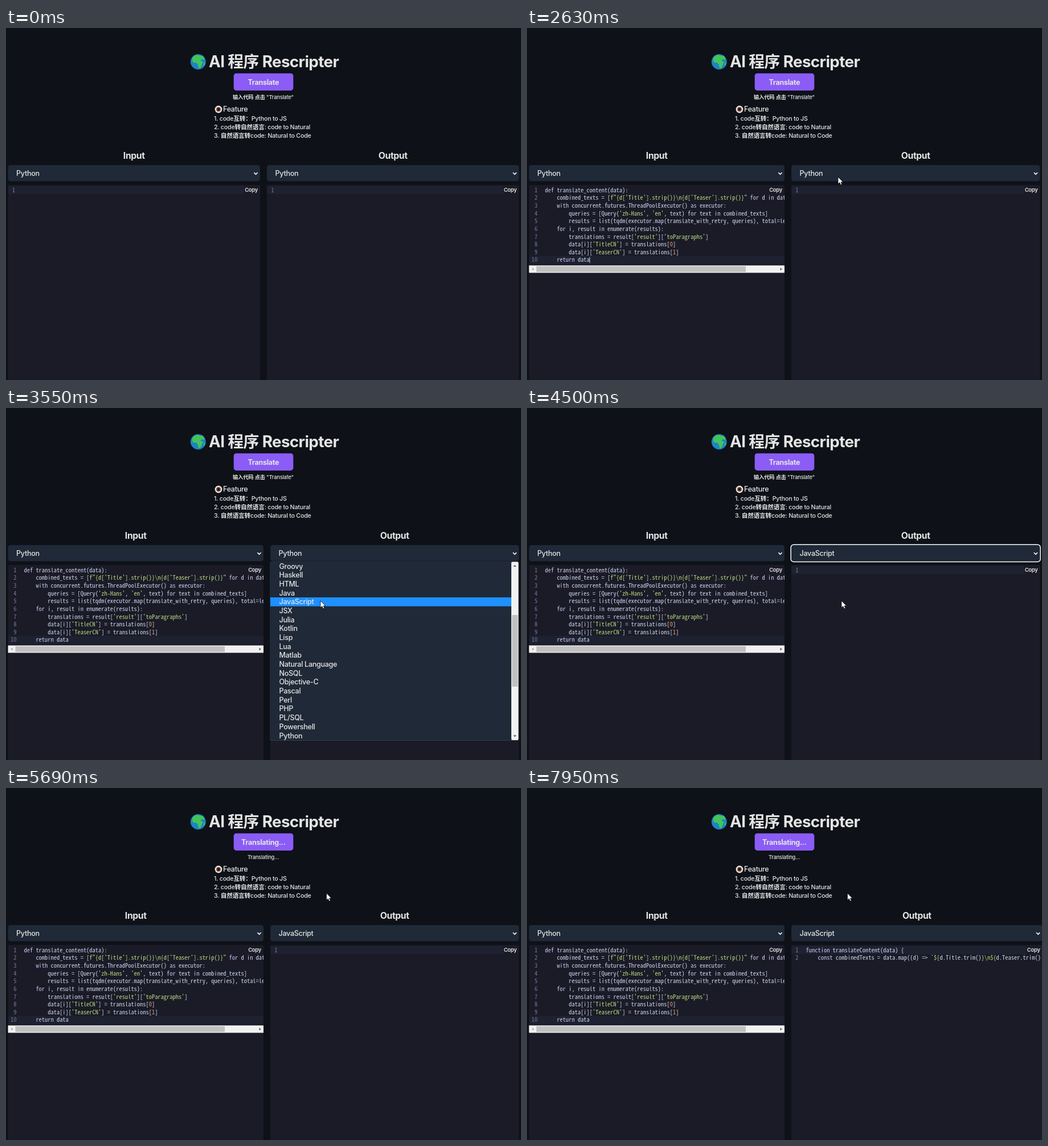
An HTML page that plays this animation: 904 by 619 pixels, repeating every 8000 ms.

```html
<!DOCTYPE html>
<html lang="zh">
<head>
<meta charset="utf-8">
<title>AI 程序 Rescripter</title>
<style>
  html, body { margin: 0; width: 100%; height: 100%; overflow: hidden; background: #0e1117; }
  svg { display: block; }
  text { font-family: Inter, "Noto Sans CJK SC", "Noto Sans CJK", sans-serif; fill: #e5e5e5; letter-spacing: -.022em; white-space: pre; }
  .code { font-family: "Noto Sans Mono CJK SC", "Liberation Mono", monospace; fill: #d0d7f2; letter-spacing: 0; }
  .kw { fill: #cbc6f2; }
  .str { fill: #bfdc86; }
  .num { fill: #ff9e64; }
  .gutter { fill: #787c99; }
</style>
</head>
<body>
<svg id="stage" width="904" height="619" viewBox="0 0 904 619"></svg>
<script>
const LOOP = 8000, ROW = 13.65, PITCH = 5.225, OPTION = 15.68;
const stage = document.getElementById('stage');

// Times of the state changes, in ms.
const PASTE = 2230, OPEN = 2750, PICK = 4500, CLICK = 5300, BUSY = 5430, LEAVE = 5580, WIDEN = 7950;

const pointer = [
  [100, 816, 589], [230, 640, 510], [360, 430, 420], [490, 259, 343],
  [640, 262, 338], [770, 256, 328], [900, 250, 320], [1020, 244, 313],
  [1300, 231, 296], [1430, 219, 281], [1830, 232, 298],
  [2230, 310, 296], [2360, 440, 284], [2480, 530, 270], [2630, 546, 262],
  [3030, 547, 276], [3160, 549, 299], [3290, 550, 317], [3420, 551, 331], [3550, 552, 339],
  [4630, 500, 250], [4750, 434, 150], [4900, 437, 114], [5020, 440, 98],
  [5580, 503, 142], [5690, 562.5, 185]
];

const typed = [
  [6350, 'function'], [6480, ' translateContent('], [6620, 'data) {'],
  [6750, '\n    const'], [6880, ' combinedTexts ='],
  [7020, ' data'], [7150, '.map(('], [7280, 'd) => `'], [7400, '${d.Title'],
  [7670, '.trim()}\\n'], [7820, '${d.Teaser'], [7950, '.trim()']
];

const python = String.raw`def translate_content(data):
    combined_texts = [f"{d['Title'].strip()}\n{d['Teaser'].strip()}" for d in data]
    with concurrent.futures.ThreadPoolExecutor() as executor:
        queries = [Query('zh-Hans', 'en', text) for text in combined_texts]
        results = list(tqdm(executor.map(translate_with_retry, queries), total=len(queries)))
    for i, result in enumerate(results):
        translations = result['result']['toParagraphs']
        data[i]['TitleCN'] = translations[0]
        data[i]['TeaserCN'] = translations[1]
    return data`;

const options = ['Groovy', 'Haskell', 'HTML', 'Java', 'JavaScript', 'JSX', 'Julia', 'Kotlin', 'Lisp', 'Lua',
  'Matlab', 'Natural Language', 'NoSQL', 'Objective-C', 'Pascal', 'Perl', 'PHP', 'PL/SQL', 'Powershell', 'Python'];

// Size the code font so that one column is PITCH wide.
const pen = document.createElement('canvas').getContext('2d');
pen.font = '100px "Noto Sans Mono CJK SC", "Liberation Mono", monospace';
const codeSize = 100 * PITCH / pen.measureText('0').width;

const rect = (x, y, w, h, fill, r = 0) =>
  `<rect x="${x}" y="${y}" width="${w}" height="${h}" rx="${r}" fill="${fill}"/>`;
const path = (d, fill, more = '') => `<path d="${d}" fill="${fill}" ${more}/>`;
const circle = (x, y, r, fill) => `<circle cx="${x}" cy="${y}" r="${r}" fill="${fill}"/>`;
const label = (x, y, size, str, weight = 450, anchor = 'start') =>
  `<text x="${x}" y="${y}" font-size="${size}" font-weight="${weight}" text-anchor="${anchor}">${str}</text>`;
const triangle = (x, y, angle, fill) =>
  path('M-2.6 1.4L0 -1.6L2.6 1.4Z', fill, `transform="translate(${x} ${y}) rotate(${angle})"`);

const syntax = /(?<str>f?"[^"]*"|'[^']*'|`|\$\{|\\n|(?<=\))\})|(?<kw>\b(?:def|for|in|with|as|return|function|const)\b)|(?<num>\b\d\b)/g;
const colour = line => line.replace(syntax, (m, ...rest) => {
  const groups = rest.at(-1);
  const kind = Object.keys(groups).find(k => groups[k]);
  return `<tspan class="${kind}">${m}</tspan>`;
});
const codeText = (x, row, str, cls = '', anchor = 'start') =>
  `<text class="code ${cls}" x="${x}" y="${288.6 + row * ROW}" font-size="${codeSize}" text-anchor="${anchor}">${str}</text>`;

function globe() {
  return circle(337.3, 59.5, 13.4, '#1c84c6') +
    path('M327 53Q330 47 337 47.5L341 49L345 48.5Q349 53 348 56L344 55L341 57L346 60Q343 64 342.5 68Q340 72 338 70L336.5 64L334 61L329 61Q326 58 327 53Z', '#43c35b') +
    path('M347 63L349 60L349.5 63L347 67Z', '#43c35b');
}

function header(t) {
  const busy = t >= BUSY;
  const fill = t >= CLICK && t < BUSY ? '#6d28d9' : t >= 4900 && t < LEAVE ? '#7c3aed' : '#8b5cf6';
  return globe() + label(356, 69, 27.8, 'AI 程序 Rescripter', 700) +
    rect(399.7, 79.7, 104.6, 30.2, fill, 4.5) +
    label(451.8, 99.6, 12.54, busy ? 'Translating...' : 'Translate', 700, 'middle') +
    label(451.5, 124.8, 9.3, busy ? 'Translating...' : '输入代码 点击 "Translate"', 550, 'middle') +
    circle(373, 143, 6.4, '#eee5df') + circle(373, 143, 3.9, '#6b4437') + circle(373, 143, 2, '#17110f') +
    label(381, 147.4, 12.54, 'Feature') +
    ['1. code互转：Python to JS', '2. code转自然语言: code to Natural', '3. 自然语言转code: Natural to Code']
      .map((s, i) => label(365, 163 + i * 14.9, 10.7, s, 550)).join('');
}

function panel({ left, right, title, lang, lines, active, numEnd, codeX }) {
  const w = right - left;
  const code = lines.map((s, i) =>
    codeText(left + numEnd, i, i + 1, 'gutter', 'end') + codeText(left + codeX, i, colour(s))).join('');
  return label((left + right) / 2, 230, 15.68, title, 700, 'middle') +
    rect(left, 241, w, 28.6, '#1f2937', 4.5) +
    label(left + 14.5, 260, 12.54, lang) +
    path(`M${right - 10.6} 254.2l3.1 3.1l3.1-3.1`, 'none', 'stroke="#fff" stroke-width="1.6"') +
    `<svg x="${left}" y="276" width="${w}" height="343" viewBox="${left} 276 ${w} 343">` +
    rect(left, 276, w, 343, '#1a1b26') +
    rect(left, 278 + active * ROW, w, ROW + .4, '#1e2130') + code +
    rect(right - 28, 277, 26, 15, '#1a1b26', 2) +
    label(right - 3.8, 288, 9.41, 'Copy', 600, 'end') + '</svg>';
}

function scrollbar() {
  return rect(3.5, 417.5, 448.5, 13, '#f1f1f1') + rect(16.5, 419, 367.5, 10, '#c1c1c1') +
    triangle(10, 424, -90, '#a3a3a3') + triangle(446, 424, 90, '#505050');
}

function caret(t) {
  if (t >= 1020 && t < PASTE && !(t >= 1570 && t < 2100)) return rect(28.4, 280, 1, 10.5, '#c0caf5');
  if (t >= PASTE && t < OPEN) return rect(109.6, 402.6, 1, 10.6, '#c0caf5');
  return '';
}

function dropdown(y) {
  const hot = y < 270 ? options.length - 1 : Math.floor((y - 270.3) / OPTION);
  return rect(463.5, 270, 436.5, 315, '#3b4553', 3) + rect(464, 270.3, 435.5, 314, '#1f2937', 3) +
    rect(464, 270.3 + hot * OPTION, 423, OPTION, '#1e90ff') +
    options.map((s, i) => label(479.5, 282.6 + i * OPTION, 12.54, s)).join('') +
    rect(887, 270.5, 12.5, 313.5, '#f1f1f1', 2) + rect(888.2, 364, 10.2, 126, '#c1c1c1') +
    triangle(893.2, 277.5, 0, '#505050') + triangle(893.2, 577, 180, '#505050');
}

const arrow = ([, x, y]) =>
  path('M0 0V12.2L2.8 9.6L4.8 14L6.9 13.1L5 8.9H8.8Z', '#fff',
    `transform="translate(${x} ${y})" stroke="#000" stroke-width=".7"`);

function scene(t) {
  const pasted = t >= PASTE;
  const at = pointer.findLast(p => p[0] <= t);
  const lines = typed.filter(s => s[0] <= t).map(s => s[1]).join('').split('\n');
  let out = header(t);
  out += panel({
    left: 3.5, right: pasted ? 452 : 446, title: 'Input', lang: 'Python',
    lines: pasted ? python.split('\n') : [''], active: pasted ? 9 : 0,
    numEnd: pasted ? 15 : 12.5, codeX: pasted ? 28 : 25
  });
  if (pasted) out += scrollbar();
  out += caret(t);
  out += panel({
    left: pasted ? 464 : 458, right: t >= WIDEN ? 904.7 : 900.5, title: 'Output',
    lang: t >= PICK ? 'JavaScript' : 'Python', lines, active: 0, numEnd: 12.5, codeX: 25.6
  });
  if (t >= OPEN && t < PICK) out += dropdown(at[2]);
  if (t >= PICK && t < CLICK)
    out += '<rect x="463.2" y="240.2" width="438" height="30.2" rx="5" fill="none" stroke="#fff" stroke-width="1.5"/>';
  return at ? out + arrow(at) : out;
}

let shown = '';
const start = performance.now();
function draw(now) {
  const next = scene(Math.max(0, now - start) % LOOP);
  if (next !== shown) stage.innerHTML = shown = next;
  requestAnimationFrame(draw);
}
draw(start);
</script>
</body>
</html>
```
